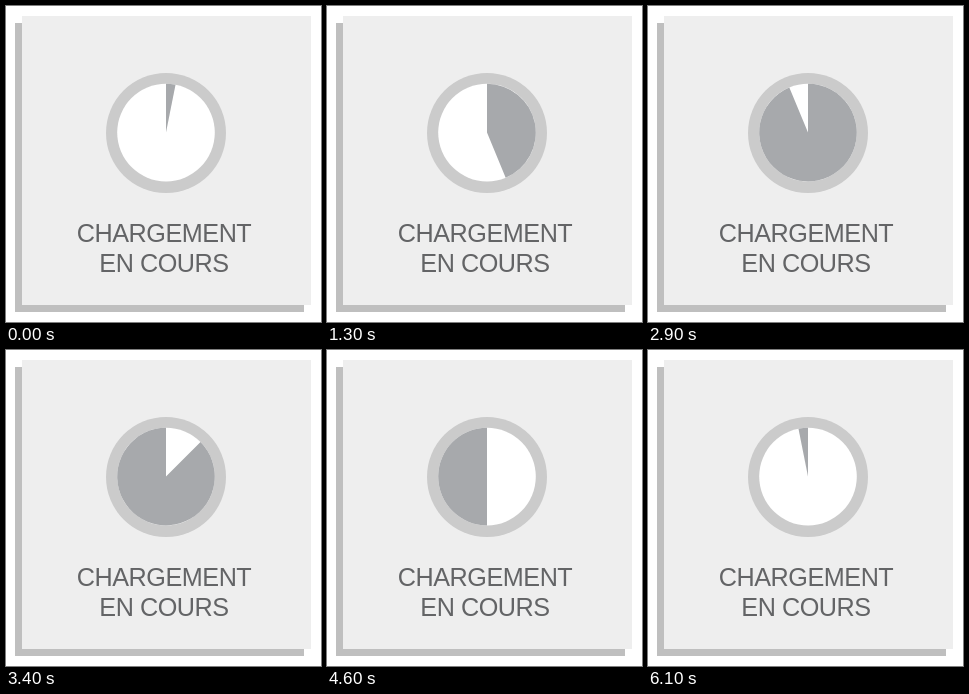
Animation of 315 by 316 pixels, one loop 6200 ms. Source, as an HTML page:

```html
<!DOCTYPE html>
<html lang="fr">
<head>
<meta charset="utf-8">
<title>Chargement</title>
<style>
  html, body {
    margin: 0;
    width: 100%;
    height: 100%;
    overflow: hidden;
    background: #fff;
  }
  svg { display: block; }
  text {
    font: 25.2px "Liberation Sans", Arial, sans-serif;
    letter-spacing: -.45px;
    text-anchor: middle;
    fill: #636466;
  }
</style>
</head>
<body>
<svg width="315" height="316" viewBox="0 0 315 316">
  <rect x="9" y="17" width="289" height="289" fill="#bfbfbf"/>
  <rect x="16" y="10" width="289" height="289" fill="#eee"/>
  <circle cx="160" cy="127" r="60" fill="#cbcbcb"/>
  <circle cx="160" cy="126.6" r="48.8" fill="#fff"/>
  <path id="pie" transform="translate(160 126.6)" fill="#a7a9ac"/>
  <text x="158" y="236.3">CHARGEMENT</text>
  <text x="158" y="266.3">EN COURS</text>
</svg>
<script>
  const STEP = 100, SECTORS = 32, RADIUS = 48.8;
  const SWEEP = SECTORS - 1; // steps per half of the loop
  const pie = document.getElementById('pie');

  // Point on the rim, counted in sectors clockwise from the top
  function rim(n) {
    const a = n / SECTORS * 2 * Math.PI;
    return `${RADIUS * Math.sin(a)} ${-RADIUS * Math.cos(a)}`;
  }

  function sector(from, to) {
    const large = to - from > SECTORS / 2 ? 1 : 0;
    return `M0 0L${rim(from)}A${RADIUS} ${RADIUS} 0 ${large} 1 ${rim(to)}Z`;
  }

  // The first half fills the dial, the second half empties it
  function draw() {
    const step = Math.floor(performance.now() / STEP) % (2 * SWEEP);
    const n = step % SWEEP + 1;
    pie.setAttribute('d', step < SWEEP ? sector(0, n) : sector(n, SECTORS));
    requestAnimationFrame(draw);
  }
  draw();
</script>
</body>
</html>
```
